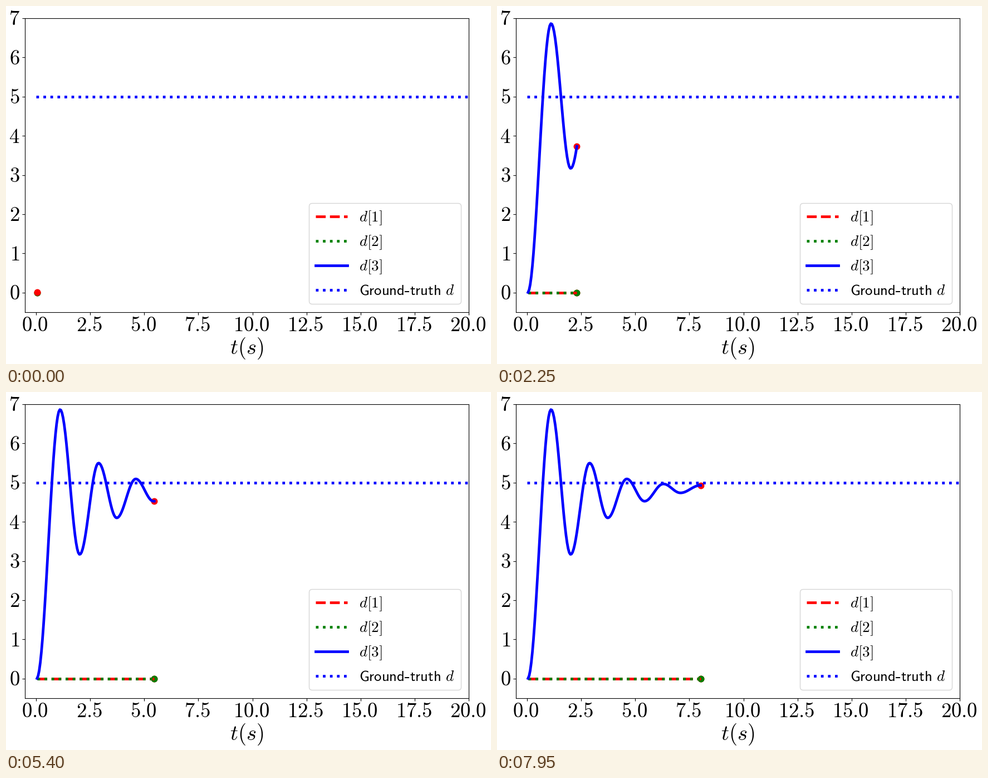
These frames come from a looping animation (871 by 643 pixels, 8 s). A matplotlib script:

```python
import numpy as np
import matplotlib.pyplot as plt
from matplotlib.animation import FuncAnimation
from matplotlib.patches import FancyBboxPatch, Rectangle

plt.rcParams["mathtext.fontset"] = "cm"

W, H, DPI = 871, 643, 100
LEFT, RIGHT, TOP, BOTTOM = 34.35, 831.4, 22, 550
FRAMES, INTERVAL = 160, 50
LW = 3.43

# Turning points of the damped estimate, joined by half cosines
TURN_T = [0.03, 1.115, 2.02, 2.893, 3.73, 4.61, 5.43, 6.30, 7.09, 8.0, 8.8]
TURN_D = [0, 6.865, 3.168, 5.50, 4.10, 5.095, 4.526, 4.967, 4.739, 4.93, 4.84]


def estimate(t):
    phase = np.interp(t, TURN_T, np.arange(len(TURN_T)))
    i = np.minimum(phase.astype(int), len(TURN_T) - 2)
    ease = (1 - np.cos(np.pi * (phase - i))) / 2
    d = np.array(TURN_D)
    return d[i] + (d[i + 1] - d[i]) * ease


t = np.linspace(0, 20, 400)[1:]
zero = np.zeros_like(t)
d3 = estimate(t)

fig = plt.figure(figsize=(W / DPI, H / DPI), dpi=DPI, facecolor="white")
ax = fig.add_axes([LEFT / W, 1 - BOTTOM / H, (RIGHT - LEFT) / W, (BOTTOM - TOP) / H])
ax.set_xlim(-0.5, 20)
ax.set_ylim(-0.5, 7)
ax.set_xticks(np.arange(0, 20.1, 2.5), labels=[])
ax.set_yticks(range(8), labels=[])

# Overlay in pixel units, y downwards, for labels and legend
top = fig.add_axes([0, 0, 1, 1], zorder=5)
top.set_xlim(0, W)
top.set_ylim(H, 0)
top.axis("off")


def label(x, y, s, size, ha="left"):
    top.text(x, y, f"${s}$", fontsize=size, ha=ha, va="baseline")


for v in np.arange(0, 20.1, 2.5):
    x = LEFT + (v + 0.5) * (RIGHT - LEFT) / 20.5
    label(x - 1.8, 584.4, rf"\mathrm{{{v:.1f}}}", 26.5, "center")
for v in range(8):
    y = BOTTOM - (v + 0.5) * (BOTTOM - TOP) / 7.5
    label(24.6, y + 12.4, rf"\mathrm{{{v}}}", 26.5, "right")
label(432, 625, "t(s)", 28, "center")

top.add_patch(FancyBboxPatch(
    (544.5, 354.5), 273, 181, boxstyle="round,pad=0,rounding_size=5.5",
    fc=(1, 1, 1, 0.8), ec=(0.8, 0.8, 0.8, 0.8), lw=1))
STYLES = [("red", "--"), ("green", ":"), ("blue", "-"), ("blue", ":")]
for row, (color, ls) in enumerate(STYLES):
    y = 378.3 + 43.75 * row
    top.plot([555.8, 613.4], [y, y], color=color, ls=ls, lw=LW)
    if row < 3:
        label(634.2, y + 9, f"d[{row + 1}]", 19.6)
base = 518.6
label(634, base, r"\mathsf{Ground}", 19.2)
top.add_patch(Rectangle((716.4, base - 7), 7.2, 2, color="black", lw=0))
label(725, base, r"\mathsf{truth}", 19.2)
label(789.3, base, "d", 19.6)

ax.plot([0, 20], [5, 5], color="blue", ls=":", lw=LW)
series = []
for data, (color, ls), dot in zip((zero, zero, d3), STYLES, ("red", "green", "red")):
    line, = ax.plot([], [], color=color, ls=ls, lw=LW, zorder=2)
    mark, = ax.plot([], [], "o", color=dot, ms=7.6, zorder=1)
    series.append((data, line, mark))


def update(n):
    for data, line, mark in series:
        line.set_data(t[:n + 1], data[:n + 1])
        mark.set_data([t[n]], [data[n]])
    return [a for _, line, mark in series for a in (line, mark)]


anim = FuncAnimation(fig, update, frames=FRAMES, interval=INTERVAL,
                     init_func=lambda: update(0), repeat=True, repeat_delay=0)
plt.show()
```
